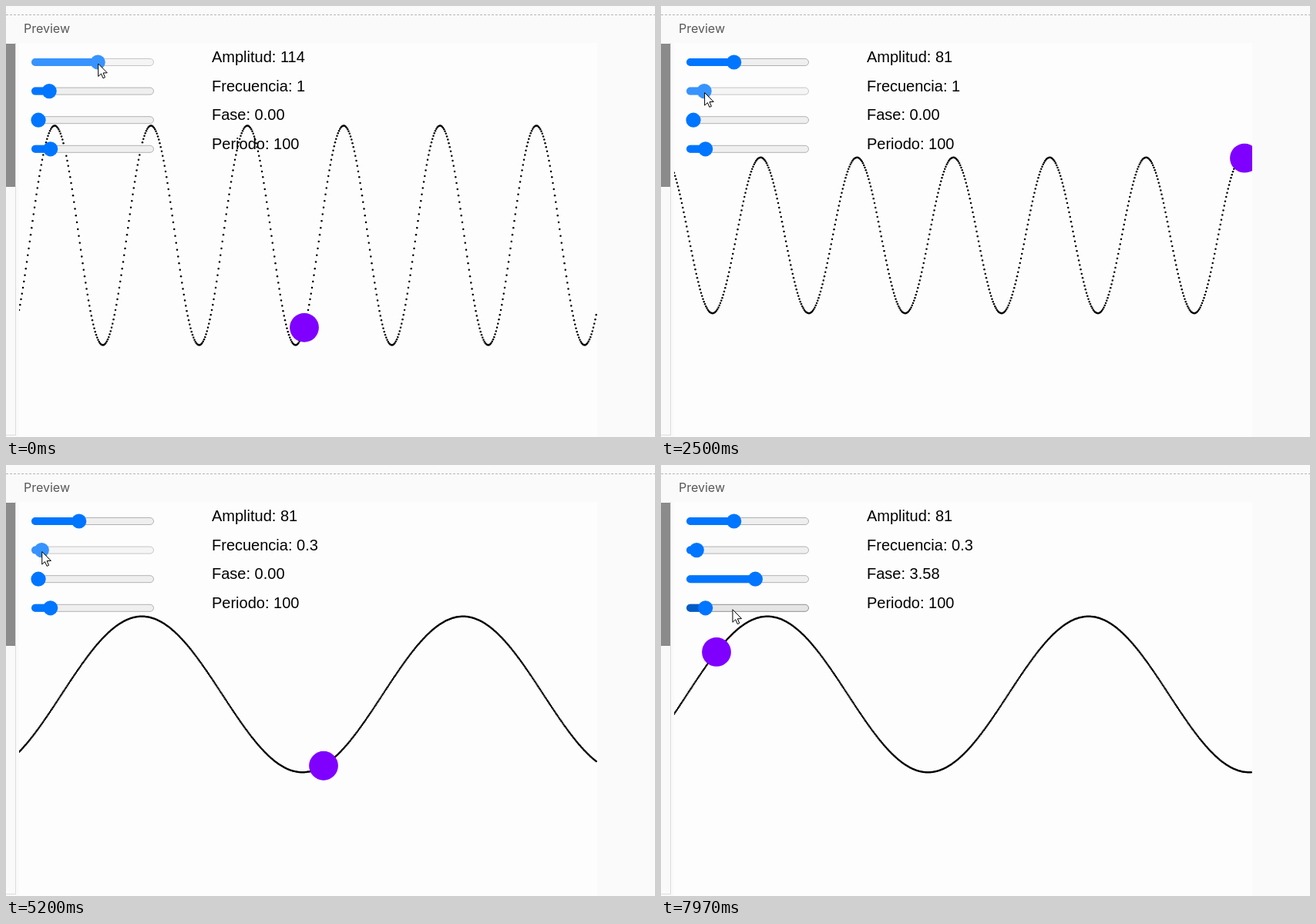
These frames come from a looping animation (842x560 px, 8 s). An HTML page with a canvas:

```html
<!DOCTYPE html>
<html lang="es">
<head>
<meta charset="utf-8">
<title>Onda senoidal</title>
<style>
  html, body { margin: 0; width: 100%; height: 100%; overflow: hidden; background: #fafafa; }
  canvas { display: block; }
</style>
</head>
<body>
<canvas id="stage" width="842" height="560"></canvas>
<script>
const ctx = document.getElementById('stage').getContext('2d');
const LOOP = 8000, TAU = Math.PI * 2;
const PANEL = { x: 17, y: 48, w: 750, h: 512, scale: 1.25, mid: 298 };

const sliders = [
  { name: 'Amplitud', min: 10, max: 200, start: 114, digits: 0 },
  { name: 'Frecuencia', min: 0, max: 10, start: 1, digits: 1 },
  { name: 'Fase', min: 0, max: TAU, start: 0, digits: 2, padded: true },
  { name: 'Periodo', min: 50, max: 500, start: 100, digits: 0, fixed: true }
];

// The pointer's visits: time in ms, slider row, value under the pointer.
const visits = [
  [0, 0, 114], [600, 0, 150], [1267, 0, 118], [1750, 0, 81],
  [2400, 1, 1], [2520, 1, 1], [3700, 1, 3], [3960, 1, 3], [5000, 1, 0.3], [5400, 1, 0.3],
  [5950, 2, 0], [6180, 2, 0], [6400, 2, 0.6], [7350, 2, 3.58], [7500, 2, 3.58],
  [7960, 3, 211]
];

const lerp = (a, b, u) => a + (b - a) * u;
const smooth = u => u * u * (3 - 2 * u);
const rowY = row => 73 + row * 37.6;
const thumbX = (row, value) => {
  const { min, max } = sliders[row];
  return 42 + 141 * (value - min) / (max - min);
};

function pose(t) {
  const values = sliders.map(s => s.start);
  const set = (row, v) => {
    if (!sliders[row].fixed) values[row] = Number(v.toFixed(sliders[row].digits));
  };
  let next = visits.findIndex(v => v[0] > t);
  if (next < 0) next = visits.length;
  visits.slice(0, next).forEach(([, row, v]) => set(row, v));

  const [t0, row, v0] = visits[next - 1];
  const [t1, row1, v1] = visits[next] || [LOOP, row, v0];
  const u = smooth((t - t0) / (t1 - t0));
  if (row1 === row) set(row, lerp(v0, v1, u));
  return {
    values,
    row: row1 === row ? row : u > 0.8 ? row1 : -1,
    cursor: [
      lerp(thumbX(row, v0), thumbX(row1, v1), u) + 0.5,
      lerp(rowY(row), rowY(row1), u) + 2
    ]
  };
}

// Two simulation steps per picture; the sketch stalls for one picture twice.
function stepAt(index, t) {
  const stalls = [600, 5800].filter(s => t > s).length;
  return 748 + 2 * (index - stalls);
}

function rect(x, y, w, h, color) {
  ctx.fillStyle = color;
  ctx.fillRect(x, y, w, h);
}

function disc(x, y, r, color) {
  ctx.fillStyle = color;
  ctx.beginPath();
  ctx.arc(x, y, r, 0, TAU);
  ctx.fill();
}

function pill(x, y, w, h, radii, color) {
  ctx.beginPath();
  ctx.roundRect(x, y, w, h, radii);
  ctx.fillStyle = color;
  ctx.fill();
}

function outline(color) {
  ctx.strokeStyle = color;
  ctx.lineWidth = 1;
  ctx.stroke();
}

function label(text, x, y, font, color) {
  ctx.font = font;
  ctx.fillStyle = color;
  ctx.fillText(text, x, y);
}

function drawPage() {
  rect(0, 0, 842, 560, '#fafafa');
  rect(PANEL.x, PANEL.y, PANEL.w, PANEL.h, '#fdfdfd');
  ctx.setLineDash([3, 2]);
  ctx.beginPath();
  ctx.moveTo(0, 11.5);
  ctx.lineTo(842, 11.5);
  outline('#b6b6ba');
  ctx.setLineDash([]);
  label('Preview', 23, 35, '16px Inter, sans-serif', '#585858');
  rect(12, 48, 1, 510, '#dcdcdc');
  rect(0, 557, 12, 1, '#dcdcdc');
  rect(0, 49, 12, 186, '#8b8b8b');
}

function drawWave([amp, freq, phase, period], step) {
  const k = PANEL.scale;
  const waveY = x => PANEL.mid + k * amp * Math.sin(TAU * freq * x / period + phase + step * 0.02);
  ctx.save();
  ctx.beginPath();
  ctx.rect(PANEL.x, PANEL.y, PANEL.w, PANEL.h);
  ctx.clip();
  for (let x = 0; x < 600; x++) disc(PANEL.x + x * k, waveY(x), 1.25, '#000');
  const ball = (step * 2) % 600;
  disc(PANEL.x + ball * k, waveY(ball), 18.9, '#7f00ff');
  ctx.restore();
}

function drawLabels(values) {
  sliders.forEach(({ name, digits, padded }, row) => {
    const value = padded ? values[row].toFixed(digits) : values[row];
    label(`${name}: ${value}`, 267, 73 + row * 37.5, '20px "Liberation Sans", Arial, sans-serif', '#000');
  });
}

function drawSlider(row, value, touched) {
  const y = rowY(row), x = thumbX(row, value);
  const active = touched && !sliders[row].fixed, hover = touched && !active;
  pill(33.5, y - 4.5, 158, 9, 4.5, active ? '#f5f5f5' : hover ? '#e5e5e5' : '#efefef');
  outline(active ? '#c6c6c6' : hover ? '#909090' : '#b2b2b2');
  pill(33, y - 5, x - 33, 10, [5, 0, 0, 5], active ? '#3793ff' : hover ? '#005cc8' : '#0075ff');
  disc(x, y, 9.6, active ? '#3793ff' : '#0075ff');
}

function drawCursor([x, y]) {
  const points = [[0, 0], [0, 16.5], [3.8, 13], [6.3, 18.8], [8.8, 17.7], [6.4, 12], [11.6, 11.8]];
  ctx.beginPath();
  points.forEach(([dx, dy]) => ctx.lineTo(x + dx, y + dy));
  ctx.closePath();
  ctx.fillStyle = '#fff';
  ctx.fill();
  outline('#000');
}

function draw(index) {
  const t = index * 100 / 3;
  const { values, row, cursor } = pose(t);
  drawPage();
  drawWave(values, stepAt(index, t));
  drawLabels(values);
  values.forEach((v, i) => drawSlider(i, v, i === row));
  drawCursor(cursor);
}

// Thirty pictures a second, timed on a 10 ms clock.
function tick() {
  const t = performance.now() % LOOP;
  draw(Math.floor(Math.floor(t / 10) * 0.3 + 1e-6));
  requestAnimationFrame(tick);
}
tick();
</script>
</body>
</html>
```
